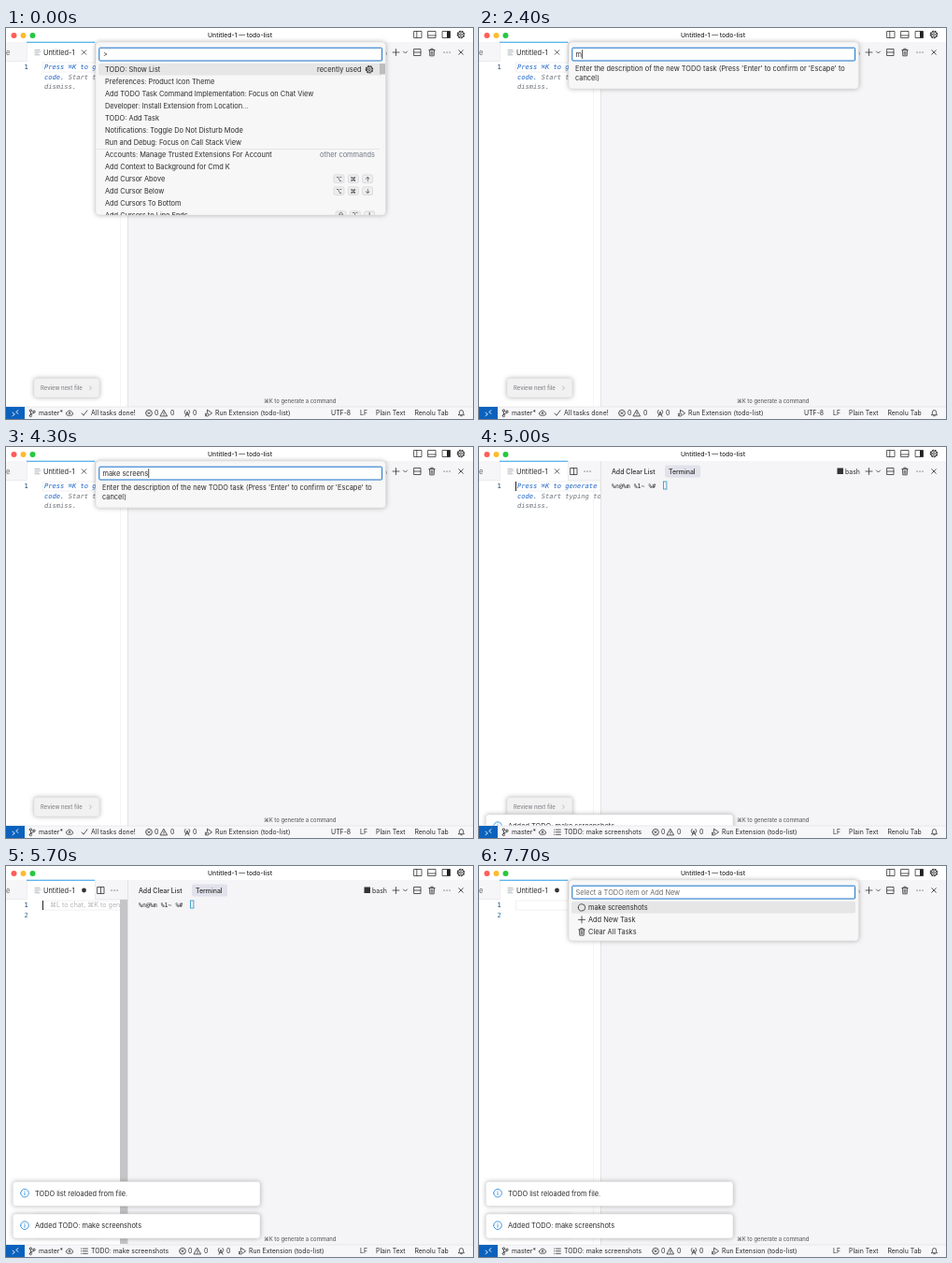
These frames come from a looping animation (500x418 px, 8 s). An HTML page:

```html
<!DOCTYPE html>
<html lang="en">
<head>
<meta charset="utf-8">
<title>Todo list</title>
<style>
html, body { margin: 0; width: 100%; height: 100%; overflow: hidden; background: #fff; }
svg { display: block; width: 500px; height: 418px; }
text { font: 7.4px Inter, "Open Sans", sans-serif; fill: #2b2b2b; white-space: pre; }
.mono { font: 7.1px "DejaVu Sans Mono", "Noto Sans Mono", monospace; }
.bar { font-size: 6.92px; }
.med { font-weight: 500; }
.ic { fill: none; stroke: #333; stroke-width: .8; stroke-linecap: round; stroke-linejoin: round; }
.card { fill: #fff; stroke: #e0e0e0; stroke-width: .6; filter: drop-shadow(0 0 2.5px rgba(0,0,0,.28)); }
</style>
</head>
<body>
<svg id="stage" viewBox="0 0 500 418"></svg>
<script>
const LOOP = 8000, ROW = 12.98;

// Markup helpers
const text = (x, y, s, attrs = '') => `<text x="${x}" y="${y}" ${attrs}>${s}</text>`;
const rect = (x, y, w, h, fill, attrs = '') =>
  `<rect x="${x}" y="${y}" width="${w}" height="${h}" fill="${fill}" ${attrs}/>`;
const group = (id, body, attrs = '') => `<g id="${id}" ${attrs}>${body}</g>`;
const icon = (x, y, d, attrs = '') =>
  `<path class="ic" transform="translate(${x} ${y})" d="${d}" ${attrs}/>`;
const dot = (x, y, r, fill) => `<circle cx="${x}" cy="${y}" r="${r}" fill="${fill}"/>`;
const ring = (r, x = 0, y = 0) =>
  `M${x - r} ${y}a${r} ${r} 0 1 0 ${2 * r} 0a${r} ${r} 0 1 0 ${-2 * r} 0`;

const frame = 'M-4-3.5H4V3.5H-4Z';
const D = {
  plus: 'M-3.5 0H3.5M0-3.5V3.5',
  cross: 'M-2.3-2.3L2.3 2.3M2.3-2.3L-2.3 2.3',
  chevron: 'M-2-1L0 1L2-1',
  trash: 'M-3.2-2.4H3.2M-1.2-2.6V-3.8H1.2V-2.6M-2.5-2.2L-2.2 3.8H2.2L2.5-2.2M-.8-.8V2.4M.8-.8V2.4',
  more: 'M-3 0h.1M0 0h.1M3 0h.1',
  split: 'M-3.5-3.5H3.5V3.5H-3.5ZM0-3.5V3.5',
  splitRow: 'M-3.5-3.5H3.5V3.5H-3.5ZM-3.5 0H3.5',
  sideLeft: frame + 'M-1.2-3.5V3.5',
  panel: frame + 'M-4 1H4',
  gear: ring(1.3) + ring(3),
  circle: ring(3.7),
  branch: ring(1.2, -1.6, -2.7) + ring(1.2, -1.6, 2.8) + ring(1.2, 2, -1.5) + 'M-1.6-1.5V1.6M2-.3C2 1-1.6 0-1.6 1.6',
  cloud: 'M-2.4 2.3A1.9 1.9 0 0 1-2.2-1.3A2.5 2.5 0 0 1 2.4-1A1.7 1.7 0 0 1 2.5 2.3ZM0 1V-.8M-1 .2L0-.8L1 .2',
  check: 'M-3 .3L-1 2.5L3-2.8',
  list: 'M-1.5-2.6H3.4M-1.5 0H3.4M-1.5 2.6H3.4M-3.5-2.6h.4M-3.5 0h.4M-3.5 2.6h.4',
  error: ring(3.4) + 'M-1.3-1.3L1.3 1.3M1.3-1.3L-1.3 1.3',
  warn: 'M0-3.2L3.6 3.2H-3.6ZM0-.8V1M0 2.1v.1',
  antenna: 'M-2 3.5L0-1.2L2 3.5M-1.2 1.6H1.2M-2-3.2A3 3 0 0 0-2 .8M2-3.2A3 3 0 0 1 2 .8M0-1.4v.1',
  debug: 'M-1.5-.8V-3.6L3.6 0L.8 2' + ring(1.5, -1.6, 1.8) + 'M-3.7 .6h.8M-3.7 3h.8',
  bell: 'M-3 2H3L2.1 .5V-1A2.1 2.1 0 0 0-2.1-1V.5ZM-.7 3H.7',
  info: ring(4.3) + 'M0-.5V2M0-2v.1',
  remote: 'M-3-.6L-.7 1.2L-3 3M3-3L.7-1.2L3 .6'
};

const gear = (x, y) => icon(x, y, D.gear) +
  icon(x, y, ring(3.7), 'stroke-dasharray="1.2 1.7" style="stroke-width:1.1"');

function titleBar() {
  return ['#ff5f57', '#febc2e', '#28c840'].map((c, i) => dot(8.5 + i * 10, 8, 3, c)).join('') +
    text(250.5, 10, 'Untitled-1 — todo-list', 'class="med" text-anchor="middle" font-size="6.8" style="font-size:6.8px"') +
    icon(441, 7, D.sideLeft) + icon(456, 7, D.panel) + icon(471.5, 7, frame) +
    rect(472, 3.5, 3.5, 7, '#222') + gear(487, 7);
}

function editor() {
  const blue = 'fill:#1c63c4', gray = 'fill:#6c7178';
  const hint = text(41, 44, 'Press ⌘K to generate', `class="mono" style="${blue};font-style:italic;font-weight:500"`) +
    text(41, 54.5, `code. <tspan style="${gray}">Start typing to</tspan>`, `class="mono" style="${blue};font-style:italic"`) +
    text(41, 65, 'dismiss.', `class="mono" style="${gray};font-style:italic"`);
  return rect(0, 15, 22, 21, '#f6f5f7') + rect(95, 15, 35, 21, '#f6f5f7') +
    rect(0, 35.5, 22, .6, '#e4e4e6') + rect(95, 35.5, 35, .6, '#e4e4e6') +
    rect(22, 15, .6, 21, '#e4e4e6') + rect(95, 15, .6, 21, '#e4e4e6') +
    rect(22, 14.7, 73, 1.1, '#38a5e6') +
    text(0, 29, 'e', 'style="fill:#666"') +
    icon(34, 26, 'M-3-2.6H2M-3-.8H3M-3 1H1M-3 2.8H2', 'style="stroke:#9aa4ae;stroke-width:.7"') +
    text(40, 29, 'Untitled-1') +
    group('clean', icon(83.5, 26, D.cross)) + group('dirty', dot(83.5, 26, 2.4, '#333')) +
    icon(101.5, 26, D.split) + icon(116, 26, D.more, 'style="stroke-width:1.2"') +
    rect(39.5, 37, 90, 10, 'none', 'stroke="#eeeeee" stroke-width=".8"') +
    rect(122, 36, .6, 368, '#eeeeee') +
    text(19.6, 44, '1', 'class="mono" style="fill:#17406f"') +
    group('line2', text(19.6, 54.5, '2', 'class="mono" style="fill:#2e6d94"')) +
    group('hint', hint) +
    group('ghost', text(47, 44, '⌘L to chat, ⌘K to generate', 'style="fill:#b4b4b8;font-size:7.1px"')) +
    group('caret', rect(39, 37, 1, 10, '#222')) +
    group('slider', rect(122, 36, 8, 368, '#c5c5c7'));
}

function terminal() {
  return rect(130, 15, 370, 390, '#f5f4f6') + rect(130, 15, .7, 390, '#dcdce0') +
    text(142, 28.5, 'Add Clear List', 'class="med" style="font-size:6.95px"') +
    rect(199, 19.5, 38, 13, '#e2e2ec', 'rx="2"') +
    text(203, 28.5, 'Terminal', 'class="med" style="font-size:6.95px"') +
    text(142, 43.5, '%n@%m %1~ %#', 'class="mono" style="font-size:6.56px;fill:#222"') +
    rect(197.5, 37, 3.4, 8, 'none', 'stroke="#3a9fc4" stroke-width=".9"') +
    rect(383.5, 22.5, 6.5, 6.5, '#333') + text(392, 28.5, 'bash', 'style="font-size:6.9px"') +
    icon(417.5, 26, D.plus) + icon(427.5, 26, D.chevron) + icon(440.5, 26, D.splitRow) +
    icon(456, 26, D.trash) + icon(472, 26, D.more, 'style="stroke-width:1.2"') + icon(487, 26, D.cross) +
    text(276, 401, '⌘K to generate a command', 'class="med" style="font-size:5.85px;fill:#666"');
}

function statusBar() {
  const label = (x, s) => text(x, 414.2, s, 'class="bar"');
  const at = (x, d) => icon(x, 411.7, d);
  const counts = at(153, D.error) + label(159, '0') + at(169, D.warn) + label(176, '0') +
    at(194, D.antenna) + label(200, '0') + at(217, D.debug) + label(224, 'Run Extension (todo-list)');
  return rect(0, 405, 500, 13, '#f7f6f8') + rect(0, 404.7, 500, .6, '#dedee2') +
    rect(0, 405, 20, 13, '#0a62bd') + icon(10, 411.7, D.remote, 'style="stroke:#fff"') +
    at(28, D.branch) + label(35, 'master*') + at(68, D.cloud) +
    group('idle', at(84, D.check) + label(91, 'All tasks done!') + label(348, 'UTF-8')) +
    group('busy', at(84, D.list) + label(91, 'TODO: make screenshots')) +
    group('counts', counts) +
    label(379, 'LF') + label(396, 'Plain Text') + label(437.5, 'Renolu Tab') + at(487.5, D.bell);
}

const toast = (id, y, s) => group(id,
  rect(7.3, y, 264.7, 26, '#fff', 'rx="3" class="card"') +
  icon(20, y + 12.2, D.info, 'style="stroke:#1a80d8"') + text(31, y + 15, s));

// Drop-down shell: backdrop, input box, body
const picker = (id, bottom, body, hint = '') => group(id,
  rect(96, 15, 310.5, bottom - 15, '#f7f7f8', 'rx="4" class="card" style="fill:#f7f7f8"') +
  rect(99.8, 21.2, 302.8, 13.8, '#fff', 'stroke="#1670c8" stroke-width="1" rx="1"') +
  text(103.5, 31, hint, 'style="fill:#6b6b6b"') + body);

const selected = rect(99, 38, 304, 12.6, '#e6e6e7', 'rx="1.5"');
const rowY = i => 44.4 + i * ROW;

function commands() {
  const names = ['TODO: Show List', 'Preferences: Product Icon Theme',
    'Add TODO Task Command Implementation: Focus on Chat View',
    'Developer: Install Extension from Location...', 'TODO: Add Task',
    'Notifications: Toggle Do Not Disturb Mode', 'Run and Debug: Focus on Call Stack View',
    'Accounts: Manage Trusted Extensions For Account', 'Add Context to Background for Cmd K',
    'Add Cursor Above', 'Add Cursor Below', 'Add Cursors To Bottom', 'Add Cursors to Line Ends'];
  const keys = (i, caps, x0) => [...caps].map((c, k) => {
    const x = x0 + k * 15.3, y = rowY(i);
    return rect(x - 5.5, y - 4.3, 11, 8.6, '#ededee', 'rx="1.5" stroke="#cfcfd2" stroke-width=".6"') +
      text(x, y + 2.3, c, 'text-anchor="middle" style="font-size:6.5px"');
  }).join('');
  return text(104, 31, '&gt;') + selected + '<g clip-path="url(#listClip)">' +
    names.map((s, i) => text(106, rowY(i) + 2.6, s)).join('') +
    keys(9, '⌥⌘↑', 356.5) + keys(10, '⌥⌘↓', 356.5) + keys(12, '⇧⌥I', 358.5) + '</g>' +
    text(380.5, 47, 'recently used', 'text-anchor="end"') + gear(389, 44.3) +
    rect(97, 129, 303, .6, '#dcdcde') +
    text(395, 138, 'other commands', 'text-anchor="end" style="fill:#6f7680"') +
    rect(400, 38, 6, 11.5, '#bdbdbf');
}

const items = rows => selected + rows.map(([d, s], i) =>
  icon(110, rowY(i), d) + text(117, rowY(i) + 2.6, s)).join('');
const base = [[D.plus, 'Add New Task'], [D.trash, 'Clear All Tasks']];
const pickHint = 'Select a TODO item or Add New';

const prompt =
  text(103, 45.6, "Enter the description of the new TODO task (Press 'Enter' to confirm or 'Escape' to") +
  text(103, 55.6, 'cancel)') +
  group('placeholder', text(103.5, 31, 'Task description', 'style="fill:#6b6b6b"')) +
  text(103.5, 31, '', 'id="typed"');

document.getElementById('stage').innerHTML =
  `<defs><clipPath id="editClip">${rect(0, 14, 130, 391, '#000')}</clipPath>
   <clipPath id="listClip">${rect(96, 36, 311, 164, '#000')}</clipPath>
   <clipPath id="bodyClip">${rect(0, 0, 500, 404.7, '#000')}</clipPath></defs>` +
  rect(0, 0, 500, 418, '#fff') + titleBar() +
  `<g clip-path="url(#editClip)">${editor()}</g>` + terminal() +
  rect(30, 374.5, 70, 20.5, '#f1f1f2', 'rx="3" class="card" style="fill:#f1f1f2"') +
  text(37, 387, 'Review next file', 'class="med" style="font-size:5.95px;fill:#88888c"') +
  icon(90.5, 384.8, 'M-.8-1.8L.8 0L-.8 1.8', 'style="stroke:#aaa"') +
  `<g clip-path="url(#bodyClip)">${toast('reloaded', 337.5, 'TODO list reloaded from file.') +
    toast('added', 372, 'Added TODO: make screenshots')}</g>` +
  statusBar() +
  picker('palette', 200, commands()) +
  picker('pickEmpty', 67, items(base), pickHint) +
  picker('prompt', 65, prompt) +
  picker('pickTask', 80, items([[D.circle, 'make screenshots'], ...base]), pickHint) +
  group('inputCaret', rect(0, 23.2, .8, 9.8, '#222'));

// Timing
const TASK = 'make screenshots';
const KEYS = [2400, 2500, 2600, 2700, 2900, 3100, 3300, 3400, 3600, 3700, 3900, 4300, 4400, 4500, 4600, 4700];
const SHOWN = {
  palette: [[0, 300], [6700, 7200]],
  pickEmpty: [[300, 1700]],
  prompt: [[1700, 4800]],
  pickTask: [[7200, LOOP]],
  placeholder: [[1700, 2400]],
  idle: [[0, 4900]],
  busy: [[4900, LOOP]],
  clean: [[0, 5200]],
  dirty: [[5200, LOOP]],
  hint: [[0, 5200]],
  line2: [[5200, LOOP]],
  ghost: [[5300, 6700]],
  caret: [[4800, 5900], [6400, 6700]],
  slider: [[5200, 6500]],
  added: [[4900, LOOP]],
  reloaded: [[5300, LOOP]],
  inputCaret: [[400, 900], [1700, 2200], [2400, 4800], [7300, 7700]]
};

const el = Object.fromEntries([...document.querySelectorAll('[id]')].map(n => [n.id, n]));
const clamp = v => Math.min(1, Math.max(0, v));
const easeOut = v => 1 - (1 - clamp(v)) ** 2;

function draw(t) {
  for (const id in SHOWN) {
    const on = SHOWN[id].some(([a, b]) => t >= a && t < b);
    el[id].style.display = on ? '' : 'none';
  }
  const typed = TASK.slice(0, KEYS.filter(k => k <= t).length);
  if (el.typed.textContent !== typed) el.typed.textContent = typed;
  const typing = t >= 2400 && t < 4800;
  const caretX = 103.5 + (typing ? el.typed.getComputedTextLength() + .3 : 0);
  el.inputCaret.setAttribute('transform', `translate(${caretX} 0)`);

  el.counts.setAttribute('transform', `translate(${t < 4900 ? 0 : 36} 0)`);
  el.added.setAttribute('transform', `translate(0 ${33 * (1 - easeOut((t - 4935) / 320))})`);
  const rise = easeOut((t - 5250) / 300);
  el.reloaded.setAttribute('transform', `translate(0 ${30 * (1 - rise)})`);
  el.reloaded.setAttribute('opacity', rise);
  el.slider.setAttribute('opacity', 1 - clamp((t - 5900) / 600));
}

const start = performance.now();
function tick() {
  const t = (performance.now() - start) % LOOP;
  draw(Math.floor(t / 100) * 100);
  requestAnimationFrame(tick);
}
draw(0);
requestAnimationFrame(tick);
</script>
</body>
</html>
```
